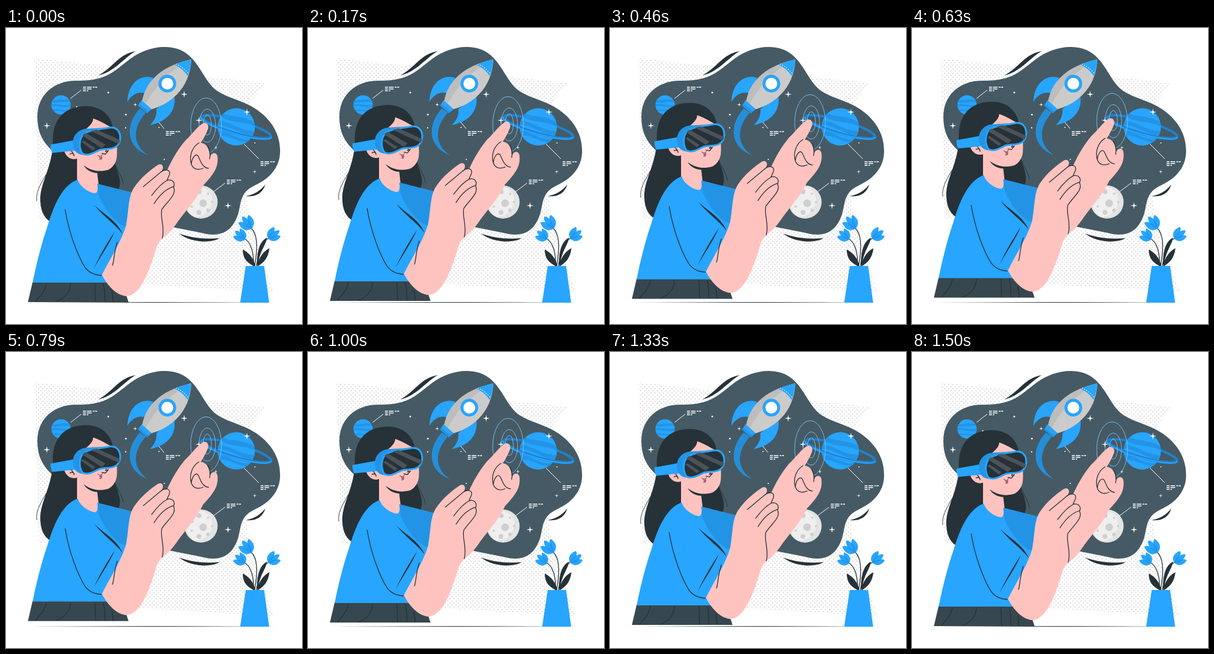
Recreate the animation shown at these times as an HTML page. Size 500 by 500 pixels, loop 1540 ms.

```html
<!DOCTYPE html>
<html lang="en">
<head>
<meta charset="utf-8">
<title>Virtual space</title>
<style>
html, body { margin: 0; height: 100%; overflow: hidden; background: #fff; }
svg { display: block; width: 100%; height: 100%; }
.blue { fill: #28a5ff; }
.deep { fill: #2394e5; }
.dark { fill: #263238; }
.skin { fill: #ffc3bf; }
.white { fill: #fff; }
.line { fill: none; stroke: #263238; stroke-width: 1.3; stroke-linecap: round; stroke-linejoin: round; }
.fine { stroke-width: .9; }
.thin { fill: none; stroke: #fff; }
</style>
</head>
<body>
<svg viewBox="0 0 500 500">
  <defs>
    <pattern id="dots" width="7.1" height="7.1" patternUnits="userSpaceOnUse">
      <g fill="#dedede"><circle cx="1.8" cy="1.8" r="1.3"/><circle cx="5.35" cy="5.35" r="1.3"/></g>
    </pattern>
    <path id="space" d="M53 150C53 112 82 89 118 89C172 90 184 71 210 52C226 40 247 32 268 32C325 32 328 88 358 107C382 122 408 123 434 146C455 165 463 186 463 208C463 238 442 256 420 266C388 281 401 304 386 328C374 350 352 352 330 346C290 338 250 330 200 320C130 300 110 260 95 225C80 205 53 195 53 150Z"/>
    <clipPath id="spaceClip"><use href="#space"/></clipPath>
    <clipPath id="ballClip"><circle r="31.5"/></clipPath>
    <g id="planet" clip-path="url(#ballClip)">
      <circle class="blue" r="32"/>
      <path class="deep" d="M-32-18C-14-10 0-24 32-15V-9C8-14-12-2-32-10ZM-32-2C-10-6 8 5 32-2V6C10 11-12 0-32 5ZM-28 15C-8 10 8 22 30 13V19C10 25-8 16-24 22Z"/>
    </g>
    <g id="flower">
      <path class="blue" d="M0 0C-12-2-14-12-11-22C-8-22-5-20-4-17C-3-22-1-25 1-26C3-24 5-21 5-17C7-20 9-21 11-21C14-12 12-2 0 0Z"/>
      <path class="deep" d="M0 0C-4-6-5-11-4-17C-1-11 0-6 0 0C0-7 2-13 5-17C6-10 4-4 0 0Z"/>
    </g>
    <path id="lens" d="M125 192C127 172 150 173 176 168C191 167 195 181 192 192C187 207 171 203 158 206C146 212 137 217 129 212C125 206 124 199 125 192Z"/>
    <clipPath id="lensClip"><use href="#lens"/></clipPath>
  </defs>

  <path fill="url(#dots)" d="M48 51L439 93L392 150L405 275L412 325L452 446L190 431L150 325L55 323Z"/>
  <use href="#space" fill="#455a64"/>
  <path class="dark" d="M219 39C190 44 181 67 156 80C183 74 195 54 219 39ZM438 264C434 280 420 286 405 284C420 281 430 275 438 264ZM292 347C313 363 345 364 361 355C335 357 315 355 292 347Z"/>
  <g id="specks" class="white" clip-path="url(#spaceClip)"></g>
  <use href="#planet" transform="translate(93 130) scale(.52)"/>

  <!-- rocket -->
  <path class="deep" opacity=".9" d="M226 136C200 165 203 201 240 215C216 199 211 172 236 143Z"/>
  <path class="blue" d="M249 84C226 77 206 94 205 125C212 113 222 107 234 110ZM284 112C289 139 273 158 243 164C252 155 255 147 254 137Z"/>
  <path fill="#cbcbcb" d="M230 124C235 96 255 66 313 53C311 104 275 130 243 138Z"/>
  <path fill="#bdbdbd" d="M230 124C235 96 255 66 313 53C276 72 252 98 235 130Z"/>
  <path class="blue" d="M285 62Q298 56 313 53Q312 67 307 81Q298 68 285 62Z"/>
  <path class="blue" d="M229 122L246 137L238 144L223 131Z"/>
  <path class="deep" d="M225 128L241 141L238 144L223 131Z"/>
  <path d="M288 61Q299 66 308 77" fill="none" stroke="#e6f4ff" stroke-width="1.7" stroke-linecap="round" stroke-dasharray="0 4"/>
  <circle class="white" cx="272.5" cy="94" r="12.5" stroke="#28a5ff" stroke-width="5"/>

  <!-- ringed planet -->
  <g transform="translate(389 167) rotate(16)" fill="none">
    <path d="M-61 0A61 11 0 0 1 61 0" stroke="#1d82d0" stroke-width="4"/>
    <use href="#planet"/>
    <path d="M-61 0A61 11 0 0 0 61 0" stroke="#1d82d0" stroke-width="5"/>
    <path d="M-62 0A62 12 0 0 0 62 0" stroke="#28a5ff" stroke-width="2"/>
  </g>

  <!-- moon -->
  <circle fill="#e3e3e3" cx="329.5" cy="294" r="28"/>
  <path fill="#efefef" d="M318 268C340 266 350 280 348 295C345 311 331 320 318 319C303 311 297 285 318 268Z"/>
  <g id="craters" fill="#cfcfcf" transform="translate(333 296)"></g>
  <g id="sky"></g>

  <!-- table and vase -->
  <path class="dark" d="M40 463.5L250 462.9L460 463.5L250 464.1Z"/>
  <path class="line" d="M420 402C427 364 423 346 414 338M418 402C419 380 414 362 403 356M423 402C427 375 435 359 444 355"/>
  <path class="dark" d="M421 403C404 396 400 386 400 374C412 381 420 391 421 403ZM424 403C427 387 435 377 445 372C443 389 435 397 424 403ZM424 400C424 372 430 360 441 354C439 367 429 376 426 398Z"/>
  <use href="#flower" transform="translate(415 339) rotate(-40)"/>
  <use href="#flower" transform="translate(404 357) rotate(-52) scale(.85)"/>
  <use href="#flower" transform="translate(443 356) rotate(52) scale(.9)"/>
  <path class="blue" d="M405 402H436L444.500 464H395.500Z"/>

  <g id="woman">
    <g fill="none" stroke="#7fc6ff" stroke-width=".9">
      <ellipse cx="338" cy="165" rx="26" ry="47"/>
      <ellipse cx="340" cy="165" rx="14" ry="28"/>
      <ellipse cx="340" cy="164" rx="7" ry="17"/>
    </g>

    <!-- hair behind -->
    <path class="dark" d="M80 185C80 235 56 262 58 293C59 312 66 322 75 327L120 290L188 276C200 261 185 235 178 215Z"/>
    <path class="line fine" d="M68 247C57 266 50 278 52 292M183 226C188 242 197 250 198 263"/>

    <!-- pointing arm -->
    <path class="skin" d="M255 290C265 250 282 215 303 190C314 180 322 168 331 162C337 157 344 163 341 171C338 179 333 188 329 194C337 194 344 203 345 217C347 210 355 209 357 216C360 235 350 248 333 266C323 288 304 308 291 326C281 341 272 351 262 356L240 370Z"/>
    <path class="line" d="M326 194C314 201 309 217 313 230C317 240 326 240 333 237M313 230C314 219 321 210 325 217C329 226 332 236 342 237M341 200C345 208 345 216 344 221"/>

    <!-- skirt -->
    <path fill="#37474f" d="M45 429H168L202 448L207 463H37Z"/>
    <path class="line" d="M68 432C66 447 54 456 50 462M109 432C108 449 98 457 85 462M150 432C152 445 149 455 152 462M164 432C169 446 165 455 168 462M179 445L181 462"/>

    <!-- neck and shirt -->
    <path class="skin" d="M120 210V270L150 285L157 270L153 235Z"/>
    <path class="blue" d="M121 256C91 267 78 310 70 335C58 370 50 405 45 430H170L190 390L205 335L213 278L154 263C156 274 154 280 149 279C138 277 125 268 121 256Z"/>
    <path class="deep" d="M155 264L213 278L203 334C195 339 167 311 156 281Z"/>
    <path class="line" d="M100 307C106 345 121 385 134 405C142 415 151 417 161 418"/>
    <path class="dark" d="M149 299C168 317 187 325 197 348C183 330 166 320 149 299ZM184 343C170 365 158 384 148 407C158 388 173 368 184 343Z"/>

    <!-- supporting arm -->
    <path class="skin" d="M162 417C178 386 196 358 203 333C208 305 206 286 216 270C228 252 246 238 257 231C265 228 268 236 262 243C270 237 279 240 276 248L272 257C282 253 287 261 284 268C286 275 285 281 279 290L263 307C262 322 270 336 265 355C258 361 255 366 252 378C239 420 225 451 204 453C188 452 173 438 162 417Z"/>
    <path class="line" d="M232 268L262 243M246 283C257 268 267 260 273 257M250 297C260 281 270 272 283 268M263 308C260 319 269 338 264 355M188 362C182 380 183 391 180 401"/>
    <path class="line" d="M262 243C270 237 279 240 276 248L272 257C283 255 286 263 283 269C289 281 274 291 263 307"/>

    <!-- head -->
    <path class="skin" d="M119 170C125 145 170 145 182 170C188 188 188 210 187 219C184 239 164 247 146 242C132 237 124 230 120 220Z"/>
    <path class="dark" d="M131 232C145 242 158 244 174 239C158 249 140 246 131 232Z"/>
    <path class="dark" d="M80 204C74 157 97 132 135 132C162 132 179 149 181 172C174 162 160 162 147 153C148 165 128 172 119 190V210L100 218Z"/>
    <path class="skin" d="M148 153C158 157 168 161 175 168L141 173C145 166 149 160 148 153Z"/>
    <path class="skin" d="M120 204C111 195 99 197 98 206C100 218 112 225 121 220Z"/>
    <path class="line" d="M103 205C109 205 114 210 115 216M108 213C111 211 113 211 115 214"/>
    <path class="line" d="M163 203L172 201L168 209L173 207L168 213L162 212"/>
    <path fill="#b54d78" d="M157 217Q160 219 162 216Q164 221 159 221Z"/>
    <path class="line fine" d="M155 215Q160 219 163 214M158 222Q160 223 162 221"/>

    <!-- goggles -->
    <path class="blue" d="M75 197L119 189V207L78 211C76 207 75 202 75 197Z"/>
    <path class="deep" d="M113 194C113 180 124 170 138 170L173 168L148 210C138 216 123 216 117 208C114 204 113 200 113 194Z"/>
    <use href="#lens" class="dark" stroke="#28a5ff" stroke-width="3"/>
    <g clip-path="url(#lensClip)">
      <path fill="#4b5358" d="M126 180L134 177L168 197L162 203ZM143 174L152 171L194 190L191 196ZM127 192L131 190L151 203L147 207Z"/>
    </g>
  </g>
</svg>
<script>
const at = id => document.getElementById(id);
const circle = (x, y, r) => `<circle cx="${x}" cy="${y}" r="${r}"/>`;
const star = (x, y, r) => {
  const k = r * .16;
  return `<path d="M${x} ${y - r}l${k} ${r - k}l${r - k} ${k}l${k - r} ${k}l${-k} ${r - k}l${-k} ${k - r}l${k - r} ${-k}l${r - k} ${-k}Z"/>`;
};
// Three rows of dashes with a leader running off by (dx, dy).
const label = (x, y, dx, dy) => `<path class="thin" d="M${x - 3} ${y + 5 * Math.sign(dy)}l${dx} ${dy}"/>
  <path class="thin" stroke-dasharray="5 1.5 8 2 3 1" stroke-width="1.7" d="M${x} ${y}h24m-24 3h16m-16 3h9"/>`;

let seed = 7;
const random = () => (seed = seed * 16807 % 2147483647) / 2147483647;

let specks = '';
for (let i = 0; i < 24; i++) {
  const x = 60 + 390 * random(), y = 50 + 280 * random();
  specks += i % 3 ? circle(x, y, .8 + random()) : star(x, y, 3.5);
}
at('specks').innerHTML = specks;

const bigStars = [[69, 165], [301, 112], [326, 156], [407, 142], [375, 300]];
at('sky').innerHTML = label(130, 100, -18, 14) + label(270, 175, -9, -11) +
  label(373, 257, -20, 15) + label(430, 226, -25, -25) +
  `<g class="white">${bigStars.map(([x, y]) => star(x, y, 6)).join('')}</g>`;

let craters = circle(0, 0, 6.5);
for (let a = 0; a < 7; a++) craters += circle(18 * Math.cos(a * .9) - 3, 18 * Math.sin(a * .9) - 2, 2 + a % 3);
at('craters').innerHTML = craters;

const LOOP = 1540, HALF = 750, RISE = 9;
function draw(now) {
  const t = now % LOOP;
  const lift = RISE * Math.max(0, 1 - Math.abs(t / HALF - 1));
  at('woman').setAttribute('transform', `translate(0 ${-lift})`);
  requestAnimationFrame(draw);
}
draw(performance.now());
</script>
</body>
</html>
```
